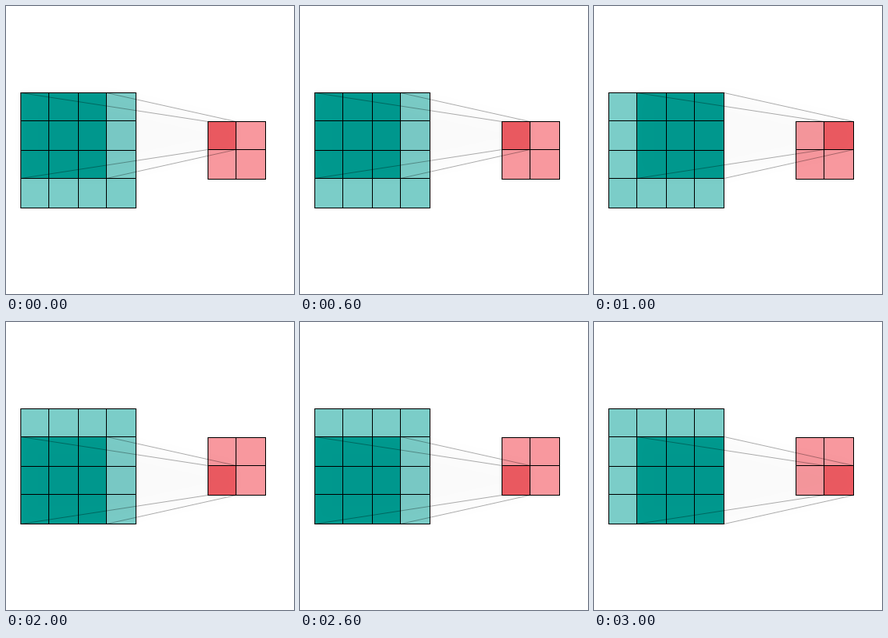
An HTML page for the animation above (4 s loop, 360 px wide and 360 px high).

```html
<!DOCTYPE html>
<html lang="en">
<head>
<meta charset="utf-8">
<title>Convolution</title>
<style>
html, body { margin: 0; width: 100%; height: 100%; overflow: hidden; background: #fff; }
svg { display: block; width: 100vw; height: 100vh; }
</style>
</head>
<body>
<svg viewBox="0 0 360 360">
  <defs>
    <filter id="soft" filterUnits="userSpaceOnUse" x="0" y="0" width="360" height="360">
      <feGaussianBlur stdDeviation="9"/>
    </filter>
  </defs>
  <rect x="18" y="108" width="144" height="144" fill="#7bcdc8"/>
  <rect x="252" y="144" width="72" height="72" fill="#f8989e"/>
  <rect id="patch" fill="#009b90"/>
  <rect id="cell" fill="#ed5b62"/>
  <path id="shade" fill="#000" opacity=".016" filter="url(#soft)"/>
  <path id="grid" fill="none" stroke="#000" shape-rendering="crispEdges"/>
  <path id="rays" fill="none" stroke="#000" stroke-opacity=".4" stroke-width=".8"/>
</svg>
<script>
const STEP = 1000;
const inX = [18, 53, 90, 125, 162], inY = [108, 143, 180, 215, 252];
const outX = [252, 287, 324], outY = [144, 179, 216];
const $ = id => document.getElementById(id);

function gridPath(xs, ys) {
  const x0 = xs[0], x1 = xs.at(-1), y0 = ys[0], y1 = ys.at(-1);
  return xs.map(x => `M${x + .5} ${y0}V${y1 + 1}`).join('') +
         ys.map(y => `M${x0} ${y + .5}H${x1 + 1}`).join('');
}

function setBox(el, [x0, y0, x1, y1]) {
  const box = { x: x0, y: y0, width: x1 - x0, height: y1 - y0 };
  for (const k in box) el.setAttribute(k, box[k]);
}

const corners = ([x0, y0, x1, y1]) => [[x0, y0], [x1, y0], [x0, y1], [x1, y1]];

function draw(step) {
  const col = step % 2, row = step >> 1;
  const from = [inX[col], inY[row], inX[col + 3], inY[row + 3]];
  const to = [outX[col], outY[row], outX[col + 1], outY[row + 1]];
  setBox($('patch'), from);
  setBox($('cell'), to);

  const ends = corners(to);
  $('rays').setAttribute('d', corners(from).map(([x, y], i) =>
    `M${x + .5} ${y + .5}L${ends[i][0] + .5} ${ends[i][1] + .5}`).join(''));
  $('shade').setAttribute('d',
    `M${from[0]} ${from[1]}H${from[2]}L${to[2]} ${to[1]}V${to[3]}L${from[2]} ${from[3]}H${from[0]}Z`);
}

$('grid').setAttribute('d', gridPath(inX, inY) + gridPath(outX, outY));

let shown = 0;
draw(shown);
const start = performance.now();
function tick() {
  const step = Math.floor((performance.now() - start) / STEP) % 4;
  if (step !== shown) draw(shown = step);
  requestAnimationFrame(tick);
}
requestAnimationFrame(tick);
</script>
</body>
</html>
```
